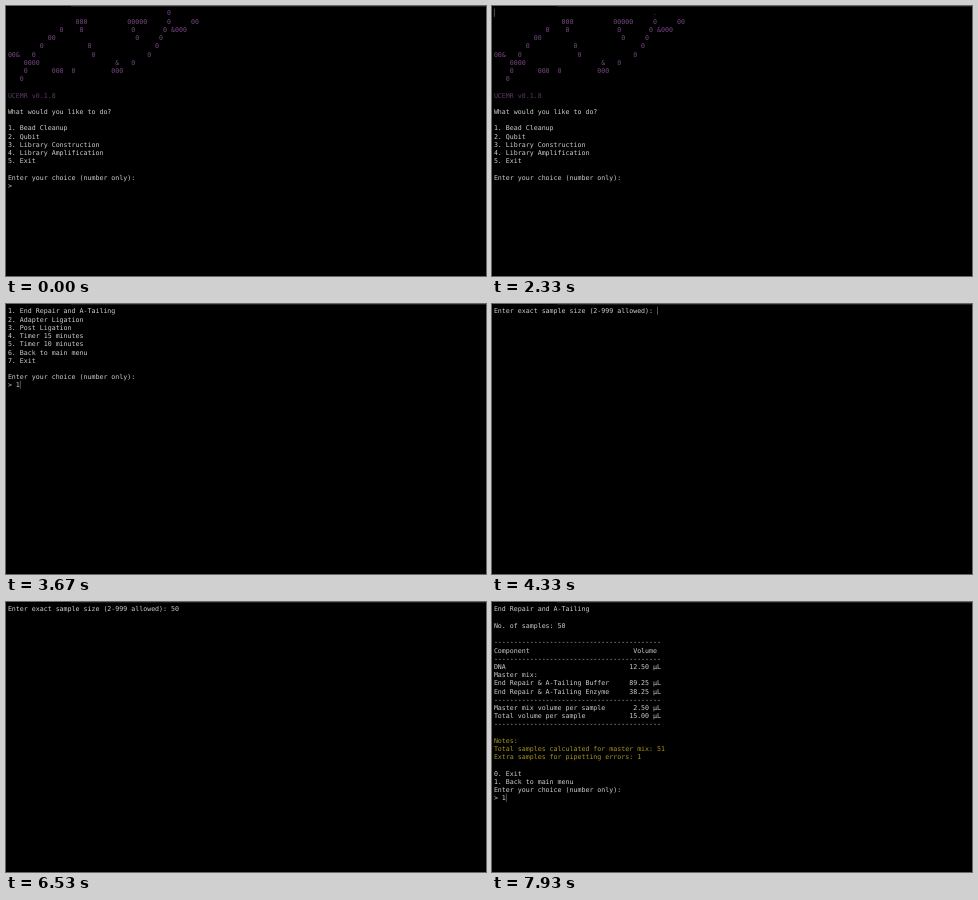
An HTML page that plays this animation: 480x270 px, repeating every 8 s.

```html
<!DOCTYPE html>
<html lang="en">
<head>
<meta charset="utf-8">
<title>Terminal session</title>
<style>
  html, body { margin: 0; width: 100%; height: 100%; overflow: hidden; background: #000; }
  svg { display: block; width: 100vw; height: 100vh; }
  text {
    font: 6.61px "DejaVu Sans Mono", "Liberation Mono", monospace;
    white-space: pre;
    text-rendering: geometricPrecision;
    fill: #cecece;
  }
  .purple { fill: #7a4885; }
  .dim { fill: #5f3768; }
  .yellow { fill: #a8941a; }
  #cursor { fill: #686868; }
</style>
</head>
<body>
<svg id="stage" viewBox="0 0 480 270">
  <rect width="480" height="270"/>
  <rect x="65" width="415" height="1" fill="#1d1d1d"/>
  <g id="screens"></g>
  <text id="typed"></text>
  <rect id="cursor" width="0.8" height="8.2"/>
</svg>
<script>
const LOOP = 8000, LEFT = 1.9, TOP = 2.6, COL = 3.98, ROW = 8.22, BASE = 6.8;
const byId = id => document.getElementById(id);
const colX = col => LEFT + col * COL;
const rowY = row => TOP + row * ROW;

function addElement(parent, tag, attrs = {}, content = '') {
  const el = document.createElementNS('http://www.w3.org/2000/svg', tag);
  for (const key in attrs) el.setAttribute(key, attrs[key]);
  el.textContent = content;
  return parent.appendChild(el);
}

// A block of lines with its first row and an optional colour class.
const block = (row, content, color = '') => ({ row, lines: content.split('\n'), color });

const helix = `                                        0
                 000          00000     0     00
             0    0            0       0 &000
          00                    0     0
        0           0                0
00&   0              0             0
    0000                   &   0
    0      000  0         000
   0`;

const mainMenu = block(12, `What would you like to do?

1. Bead Cleanup
2. Qubit
3. Library Construction
4. Library Amplification
5. Exit

Enter your choice (number only):`);

const rule = '-'.repeat(42);
const volume = (name, amount) => name + (amount + ' µL').padStart(42 - name.length);
const table = [
  'End Repair and A-Tailing', '', 'No. of samples: 50', '',
  rule, 'Component'.padEnd(35) + 'Volume', rule,
  volume('DNA', '12.50'),
  'Master mix:',
  volume('End Repair & A-Tailing Buffer', '89.25'),
  volume('End Repair & A-Tailing Enzyme', '38.25'),
  rule,
  volume('Master mix volume per sample', '2.50'),
  volume('Total volume per sample', '15.00'),
  rule
].join('\n');

const version = block(10, 'UCEMR v0.1.8', 'dim');
const screens = {
  main: [block(0, helix, 'purple'), version, mainMenu, block(21, '>')],
  clearing: [
    block(0, ' '.repeat(40) + '.', 'dim'),
    block(1, helix.slice(helix.indexOf('\n') + 1), 'purple'),
    version, mainMenu
  ],
  library: [block(0, `1. End Repair and A-Tailing
2. Adapter Ligation
3. Post Ligation
4. Timer 15 minutes
5. Timer 10 minutes
6. Back to main menu
7. Exit

Enter your choice (number only):
>`)],
  samples: [block(0, 'Enter exact sample size (2-999 allowed):')],
  result: [
    block(0, table),
    block(16, `Notes:
Total samples calculated for master mix: 51
Extra samples for pipetting errors: 1`, 'yellow'),
    block(20, `0. Exit
1. Back to main menu
Enter your choice (number only):
>`)
  ]
};

// Row and column where input starts on each screen.
const inputs = { main: [21, 2], clearing: [0, 0], library: [9, 2], samples: [0, 41], result: [23, 2] };

// Start time, screen, typed text, cursor shown.
const steps = [
  [0, 'main', '', 0], [530, 'main', '', 1], [1070, 'main', '', 0],
  [1600, 'main', '3', 1], [2200, 'main', '3', 0],
  [2330, 'clearing', '', 1],
  [2400, 'library', '', 1], [3000, 'library', '', 0], [3530, 'library', '', 1],
  [3670, 'library', '1', 1], [4270, 'library', '1', 0],
  [4330, 'samples', '', 1], [4930, 'samples', '', 0],
  [5470, 'samples', '5', 1], [5930, 'samples', '50', 1], [6530, 'samples', '50', 0],
  [6670, 'result', '', 1], [7270, 'result', '', 0], [7800, 'result', '', 1],
  [7930, 'result', '1', 1]
];

const groups = {};
for (const name in screens) {
  groups[name] = addElement(byId('screens'), 'g');
  for (const { row, lines, color } of screens[name]) {
    lines.forEach((line, i) => {
      if (line) addElement(groups[name], 'text', { x: LEFT, y: rowY(row + i) + BASE, class: color }, line);
    });
  }
}

const typed = byId('typed'), cursor = byId('cursor');
let shown;

function show(step) {
  const [, screen, input, cursorOn] = step;
  const [row, col] = inputs[screen];
  for (const name in groups) groups[name].style.display = name === screen ? '' : 'none';
  typed.textContent = input;
  typed.setAttribute('x', colX(col));
  typed.setAttribute('y', rowY(row) + BASE);
  cursor.setAttribute('x', colX(col + input.length));
  cursor.setAttribute('y', rowY(row));
  cursor.style.display = cursorOn ? '' : 'none';
}

function tick() {
  const time = performance.now() % LOOP;
  const step = steps.findLast(([start]) => start <= time);
  if (step !== shown) show(shown = step);
  requestAnimationFrame(tick);
}
tick();
</script>
</body>
</html>
```
